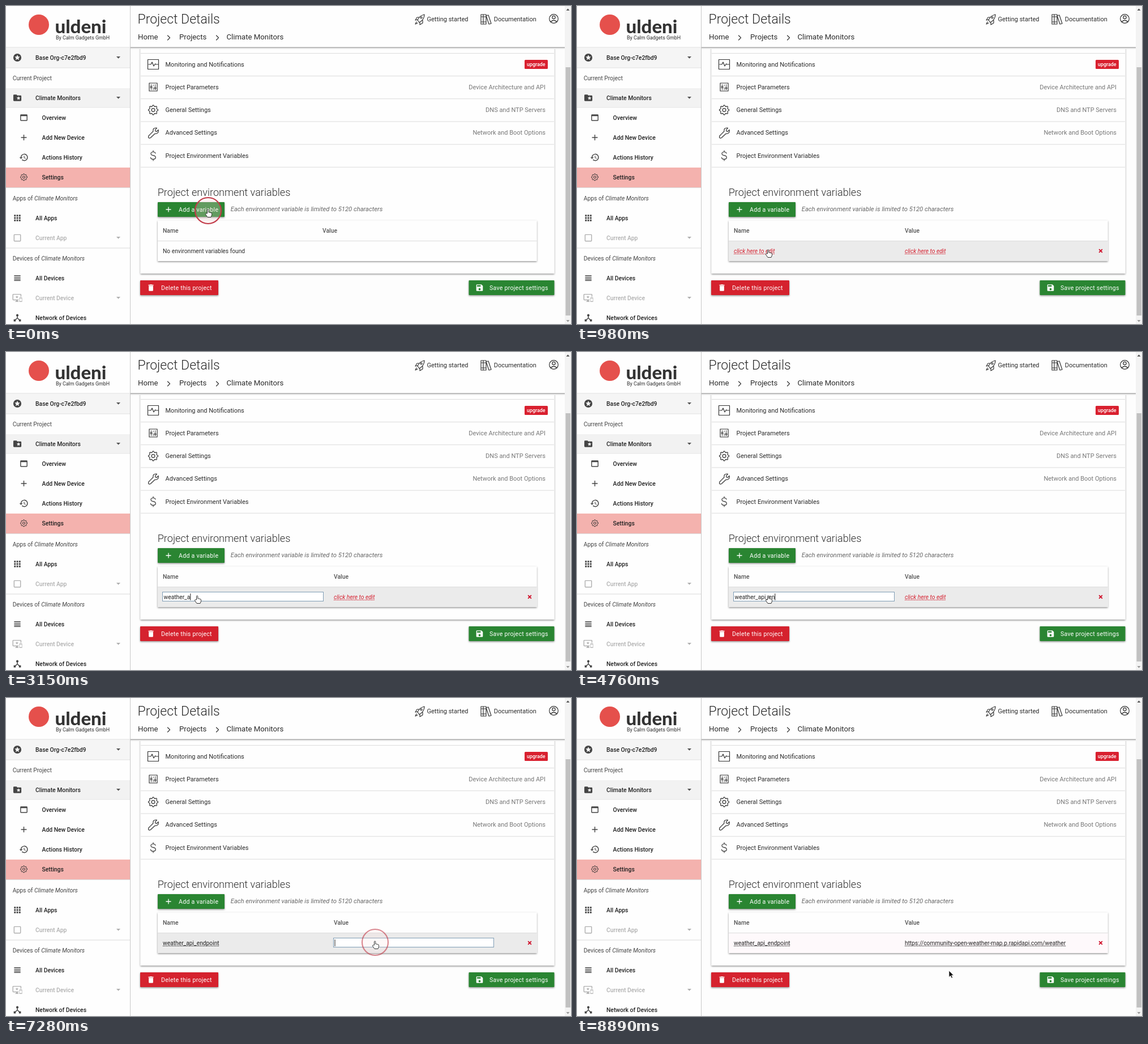
Recreate the animation shown at these times as an HTML page. Size 998 px wide and 561 px high, loop 9.1 s.

```html
<!DOCTYPE html>
<html lang="en">
<head>
<meta charset="utf-8">
<title>Project Details</title>
<style>
  html, body { margin: 0; width: 100%; height: 100%; overflow: hidden; background: #fdfdfd; }
  svg { display: block; font: 11px Roboto, sans-serif; fill: #2b2b2b; }
  text { white-space: pre; }
  .nav { font-size: 10.35px; }
  .cell { font-size: 10.25px; }
  .med { font-weight: 500; }
  .btn { font-size: 10.6px; letter-spacing: .25px; fill: #fff; }
  .line { fill: none; stroke: #333; stroke-width: 1.2; stroke-linecap: round; stroke-linejoin: round; }
</style>
</head>
<body>
<svg id="stage" width="998" height="561" viewBox="0 0 998 561"></svg>
<script>
const ORG = 'Base Org-c7e2fbd9', PROJECT = 'Climate Monitors';
const NAME = 'weather_api_endpoint';
const URL_TEXT = 'https://community-open-weather-map.p.rapidapi.com/weather';
const RED = '#d5202f', GREEN = '#2a8530', LOOP = 9100, TICK = 70;

const rect = (x, y, w, h, fill, more = '') =>
  `<rect x="${x}" y="${y}" width="${w}" height="${h}" fill="${fill}" ${more}/>`;
const text = (x, y, s, more = '') => `<text x="${x}" y="${y}" ${more}>${s}</text>`;
const icon = (cx, cy, d, size = 16, fill = '#444') =>
  `<path transform="translate(${cx} ${cy}) scale(${size / 24}) translate(-12 -12)" fill="${fill}" fill-rule="evenodd" d="${d}"/>`;
const line = (d, more = '') => `<path class="line" d="${d}" ${more}/>`;
const ring = (x, y, r, more = '') => `<circle class="line" cx="${x}" cy="${y}" r="${r}" ${more}/>`;
const hr = (x, y, w, fill = '#dcdcdc') => rect(x, y, w, 1, fill);

const ICON = {
  star: 'M12 2a10 10 0 1 0 0 20a10 10 0 1 0 0-20zM16.2 18L12 15.45 7.8 18l1.1-4.8-3.7-3.2 4.9-.4L12 5l1.9 4.5 4.9.4-3.7 3.2z',
  folder: 'M20 6h-8l-2-2H4q-2 0-2 2v12q0 2 2 2h16q2 0 2-2V8q0-2-2-2zM18 17l-3-1.7L12 17l.8-3.3-2.6-2.3 3.4-.3L15 8l1.3 3.1 3.4.3-2.5 2.3z',
  drop: 'M7 10l5 5 5-5z',
  page: 'M19 4H5q-2 0-2 2v12q0 2 2 2h14q2 0 2-2V6q0-2-2-2zM19 18H5V8h14z',
  plus: 'M19 13h-6v6h-2v-6H5v-2h6V5h2v6h6z',
  history: 'M13 3a9 9 0 0 0-9 9H1l4 4 4-4H6a7 7 0 1 1 2.1 5l-1.4 1.4A9 9 0 1 0 13 3zM12 8v5l4.3 2.5.7-1.2-3.5-2.1V8z',
  apps: [4, 10, 16].map(x => [4, 10, 16].map(y => `M${x} ${y}h4v4h-4z`).join('')).join(''),
  box: 'M19 3H5q-2 0-2 2v14q0 2 2 2h14q2 0 2-2V5q0-2-2-2zM19 19H5V5h14z',
  list: [5, 9, 13, 17].map(y => `M4 ${y}h16v2H4z`).join(''),
  devices: 'M23 11h-5q-1 0-1 1v9q0 1 1 1h5q1 0 1-1v-9q0-1-1-1zM23 20h-5v-7h5zM20 2H2Q0 2 0 4v12q0 2 2 2h7v2H7v2h8v-2h-2v-2h2v-2H2V4h18v5h2V4q0-2-2-2zM11 6l1 2.5h3l-2.4 1.8.9 2.7-2.5-1.6L8.5 13l.9-2.7L7 8.5h3z',
  hub: 'M17 16l-4-4V8.8a3 3 0 1 0-2 0V12l-4 4H3v5h5v-3l4-4.2 4 4.2v3h5v-5z',
  trash: 'M6 19q0 2 2 2h8q2 0 2-2V7H6zM19 4h-3.5l-1-1h-5l-1 1H5v2h14z',
  save: 'M17 3H5Q3 3 3 5v14q0 2 2 2h14q2 0 2-2V7zM12 19a3 3 0 1 1 0-6a3 3 0 1 1 0 6zM15 9H5V5h10z',
  close: 'M20 7L17 4 12 9 7 4 4 7 9 12 4 17 7 20 12 15 17 20 20 17 15 12z'
};

function gear(cx, cy, r, more) {
  let d = '';
  for (let i = 0; i < 32; i++) {
    const a = (i - .5) * Math.PI / 16, k = i % 4 < 2 ? r : r * .78;
    d += `${i ? 'L' : 'M'}${(cx + k * Math.cos(a)).toFixed(2)} ${(cy + k * Math.sin(a)).toFixed(2)}`;
  }
  return line(d + 'z', more) + ring(cx, cy, r * .34, more);
}

function sidebar() {
  const entry = (y, label, ic, x = 52, ix = 20, tone = '#222') =>
    icon(ix, y, ICON[ic] || '', 17, tone === '#222' ? '#444' : tone) +
    text(x, y + 3.7, label, `class="nav med" fill="${tone}"`);
  const head = (y, s) => text(11.7, y + 3.7, s, 'class="nav" fill="#444"');
  const drop = (y, tone = '#555') => icon(198.5, y - .5, ICON.drop, 17, tone);
  const off = '#b0b0b0', own = `of <tspan font-style="italic">${PROJECT}</tspan>`;
  return rect(0, 0, 219, 561, '#fefefe') +
    '<circle cx="58" cy="33" r="18" fill="#e5504c"/>' +
    text(86.5, 47.5, 'uldeni', 'style="font:800 33px Lato,sans-serif" fill="#333"') +
    text(88, 59, 'By Calm Gadgets GmbH', 'font-size="8.9"') +
    rect(0, 73, 219, 36, '#f5f5f5') + hr(0, 72.5, 219, '#e2e2e2') + hr(0, 108.5, 219, '#e2e2e2') +
    rect(0, 145, 219, 34, '#f2f2f2') + hr(0, 178.5, 219, '#e6e6e6') +
    rect(0, 285, 219, 35, '#f4b2ae') + hr(0, 320, 219) + hr(0, 426.5, 219) +
    entry(91, ORG, 'star') + drop(91) + head(127, 'Current Project') +
    entry(162, PROJECT, 'folder') + drop(162) +
    entry(197, 'Overview', 'page', 63.5, 31.5) + entry(232, 'Add New Device', 'plus', 63.5, 31.5) +
    entry(267, 'Actions History', 'history', 63.5, 31.5) + entry(302, 'Settings', '', 63.5) +
    gear(31.5, 302, 6, 'style="stroke-width:1"') +
    head(339, 'Apps ' + own) + entry(374, 'All Apps', 'apps') +
    entry(409, 'Current App', 'box', 52, 20, off) + drop(409, off) +
    head(445, 'Devices ' + own) + entry(480, 'All Devices', 'list') +
    entry(515, 'Current Device', 'devices', 52, 20, off) + drop(515, off) +
    entry(550, 'Network of Devices', 'hub') + rect(219, 0, 1, 561, '#c9c9c9');
}

function header() {
  return rect(220, 0, 767, 73, '#fefefe') + rect(220, 72.5, 767, 1.5, '#a9a9a9') + rect(220, 74, 767, 2, '#ececec') +
    text(232.5, 30.7, 'Project Details', 'font-size="23" font-weight="300"') +
    ['Home', 'Projects', PROJECT].map((s, i) => text([233, 306, 389.5][i], 59.2, s, 'font-size="13.2"')).join('') +
    line('M285.5 52l4 4-4 4M371.5 52l4 4-4 4') +
    line('M727 25q3-8 12-10q0 9-9 14zM727 24l-4 1 3-5 4 0M731 29l0 4 5-3 0-5M725 28l-2 4 4-2') + ring(733.5, 20.5, 1.5) +
    line('M839 15h4v17h-4zM843 15h5v17h-5zM848 17l4-1 5 15-4 1zM839 19h4M843 19h5M839 28h4M843 28h5') +
    text(743.5, 27, 'Getting started') + text(861.7, 27, 'Documentation') +
    ring(967.5, 22.5, 7.8) + ring(967.5, 20, 2.7) + line('M962 28q5.5-5.5 11 0');
}

function button(x, y, w, fill, ic, label, tx) {
  return rect(x, y, w, 26, fill, 'rx="1" filter="url(#lift)"') +
    icon(x + 19, y + 13, ICON[ic], 15.5, '#fff') + text(tx, y + 16.7, label, 'class="btn"');
}

function card() {
  const rows = [['Monitoring and Notifications', ''], ['Project Parameters', 'Device Architecture and API'],
    ['General Settings', 'DNS and NTP Servers'], ['Advanced Settings', 'Network and Boot Options'],
    ['Project Environment Variables', '']];
  return rect(237.5, 60, 731, 412, '#fefefe', 'filter="url(#lift)"') + hr(238, 83, 730) +
    rows.map(([a, b], i) => {
      const y = 103 + i * 40.2;
      return text(281.5, y + 3.8, a) + text(953, y + 3.8, b, 'text-anchor="end" fill="#777"') + hr(238, y + 20, 730);
    }).join('') +
    rect(916, 95, 41, 16, '#d9202f', 'rx="1.5"') + text(920, 106, 'upgrade', 'font-size="8.9" class="med" fill="#fff"') +
    line('M250.5 94.5h19v17h-19zM252 103h4l2-4 3 7 2.5-4 1 1h4') +
    line('M253 136h14v14h-14z') +
    line('M256.5 138.5v2.5M256.5 145v3M263.5 138.5v4.5M263.5 147v1M260 139v2M260 144v4', 'style="stroke-width:.9"') +
    ring(256.5, 143, 1.3) + ring(263.5, 145, 1.3) +
    gear(260, 183.5, 8.5, '') +
    line('M252 229l8-8q-1-6 5-6l1.5.3-3 3 .5 2.5 2.5.5 2.5-3q1.5 7-6 7l-8 7.5q-3 1-3.5-1.5z') +
    line('M264 260q-.5-2.5-4-2.5q-4 0-4 3q0 2.500 4 3.200q4.300.8 4.300 3.600q0 3-4.300 3q-4 0-4.500-3M260 255v2.500M260 270.300v2.500') +
    text(267.7, 334.5, 'Project environment variables', 'font-size="18.1" font-weight="300"') +
    button(268, 346, 118, GREEN, 'plus', 'Add a variable', 305) +
    text(396.7, 361.5, 'Each environment variable is limited to 5120 characters', 'font-size="11.25" font-style="italic" fill="#666"') +
    rect(268, 378.5, 669.5, 71.5, '#fefefe', 'filter="url(#lift)"') +
    text(277, 400.3, 'Name', 'class="nav med" fill="#555"') +
    button(237, 484, 138, RED, 'trash', 'Delete this project', 274) +
    button(817.5, 484, 151, GREEN, 'save', 'Save project settings', 854);
}

const stage = document.getElementById('stage');
stage.innerHTML = `<defs><filter id="lift" x="-5%" y="-20%" width="110%" height="150%">
  <feDropShadow dx="0" dy="1.3" stdDeviation="1.4" flood-opacity=".45"/></filter>
  <clipPath id="clip"><rect x="580" y="423" width="281" height="18"/></clipPath></defs>` +
  rect(0, 0, 998, 561, '#fdfdfd') + card() + header() + sidebar() +
  rect(987, 0, 11, 561, '#f3f3f3') + rect(988.5, 108, 8.5, 438, '#c1c1c1') +
  '<path d="M989.5 8l3-3.5 3 3.5z" fill="#555"/><path d="M989.5 554l3 3.5 3-3.5z" fill="#999"/><g id="live"></g>';
const live = document.getElementById('live');
const pen = document.createElement('canvas').getContext('2d');
const widthOf = (s, style = '') => (pen.font = style + ' 10.25px Roboto, sans-serif', pen.measureText(s).width);

const KEY_TIMES = [1960, 2100, 2310, 2450, 2590, 2730, 2870, 3010, 3150, 4130, 4410, 4620, 4690, 4760,
  5390, 5600, 5740, 5880, 6020, 6160];
const PATH = [[0, 357, 359], [350, 357, 359], [910, 338, 430], [6580, 338, 430], [6650, 380, 431],
  [6930, 652, 429], [8120, 652, 429], [8680, 657, 481], [LOOP, 657, 481]];
const CLICKS = [[0, 357, 361], [1050, 338, 432], [7140, 652, 431]];
const ADDED = 210, EDIT_NAME = 1190, EDIT_VALUE = 7280, PASTED = 7770, SAVED = 8050;

function pointerAt(t) {
  const i = PATH.findIndex(p => p[0] > t), [t0, x0, y0] = PATH[i - 1], [t1, x1, y1] = PATH[i];
  const k = (t - t0) / (t1 - t0), e = k * k * (3 - 2 * k);
  return [x0 + (x1 - x0) * e, y0 + (y1 - y0) * e];
}

function link(x, s, blank) {
  const tone = blank ? RED : '#222', w = widthOf(s, blank ? 'italic' : '');
  return text(x, 435.5, s, `class="cell" fill="${tone}" ${blank ? 'font-style="italic"' : ''}`) +
    `<path d="M${x} 437.5h${w}" stroke="${tone}" stroke-dasharray="1.5 1"/>`;
}

function field(x, w, s) {
  const room = w - 4, len = widthOf(s), start = x + 2.5 + Math.min(0, room - len);
  return rect(x + .5, 423.5, w - 1, 16, '#fff', 'stroke="#7f9db5"') +
    `<g ${len > room ? 'clip-path="url(#clip)"' : ''}>` + text(start, 435.5, s, 'class="cell" fill="#222"') + '</g>' +
    rect(Math.min(start + len, x + w - 3), 426, 1, 12, '#222');
}

function tableRow(t, y) {
  const valueHead = x => text(x, 400.3, 'Value', 'class="nav med" fill="#555"') + hr(268, 414, 669.5);
  if (t < ADDED) return valueHead(559) + text(277, 435.5, 'No environment variables found', 'class="cell"');
  const hover = y > 414 && y < 450;
  const typed = NAME.slice(0, KEY_TIMES.filter(k => k <= t).length);
  const name = t < EDIT_NAME ? link(277, 'click here to edit', true)
    : t < EDIT_VALUE ? field(276, 285, typed) : link(277, NAME);
  const value = t < EDIT_VALUE ? link(579, 'click here to edit', true)
    : t < SAVED ? field(578, 284, t < PASTED ? '' : URL_TEXT) : link(579, URL_TEXT);
  return rect(268, 415, 669.5, 35, hover ? '#ebebeb' : t > SAVED ? '#fef9fb' : '#fefefe') +
    valueHead(579) + name + value + icon(925, 432, ICON.close, 10.5, '#d0102a');
}

function pointer(t, x, y) {
  const shape = d => `<path transform="translate(${x} ${y})" d="${d}" `;
  if (t >= 6650 && x < 561) return shape('M-2-5h4M0-5v10M-2 5h4') + 'fill="none" stroke="#777"/>';
  const onLink = y < 372 || y > 423 && y < 441 && !(x > 561 && x < 578);
  return onLink
    ? shape('M-1.5 7V1.2Q-1.5 0-.4 0T.8 1.2V5q1.2-.6 2 .4q1.3-.5 2 .5q1.7-.2 1.7 1.4v2.5L5 13.5H-1L-4.5 8.5q-.5-1.5 1-1.5z') +
      'fill="#fff" stroke="#333" stroke-linejoin="round"/>'
    : shape('M0 0v11.5l2.7-2.5 1.9 4.2 2-.9-1.9-4.1h3.6z') + 'fill="#111" stroke="#fff" stroke-width=".7"/>';
}

function frame(now) {
  const t = Math.floor(now % LOOP / TICK) * TICK, [x, y] = pointerAt(t);
  const clicks = CLICKS.map(([at, cx, cy]) => {
    const k = (t - at) / 350;
    return k < 0 || k >= 1 ? '' : `<circle cx="${cx}" cy="${cy}" r="23" fill="#f5d5d5" fill-opacity=".28" stroke="#c23a48" stroke-width="2.2" opacity="${1 - k}"/>`;
  }).join('');
  live.innerHTML = tableRow(t, y) + clicks + pointer(t, x, y);
}

const begin = performance.now();
(function loop() {
  frame(performance.now() - begin);
  requestAnimationFrame(loop);
})();
</script>
</body>
</html>
```
